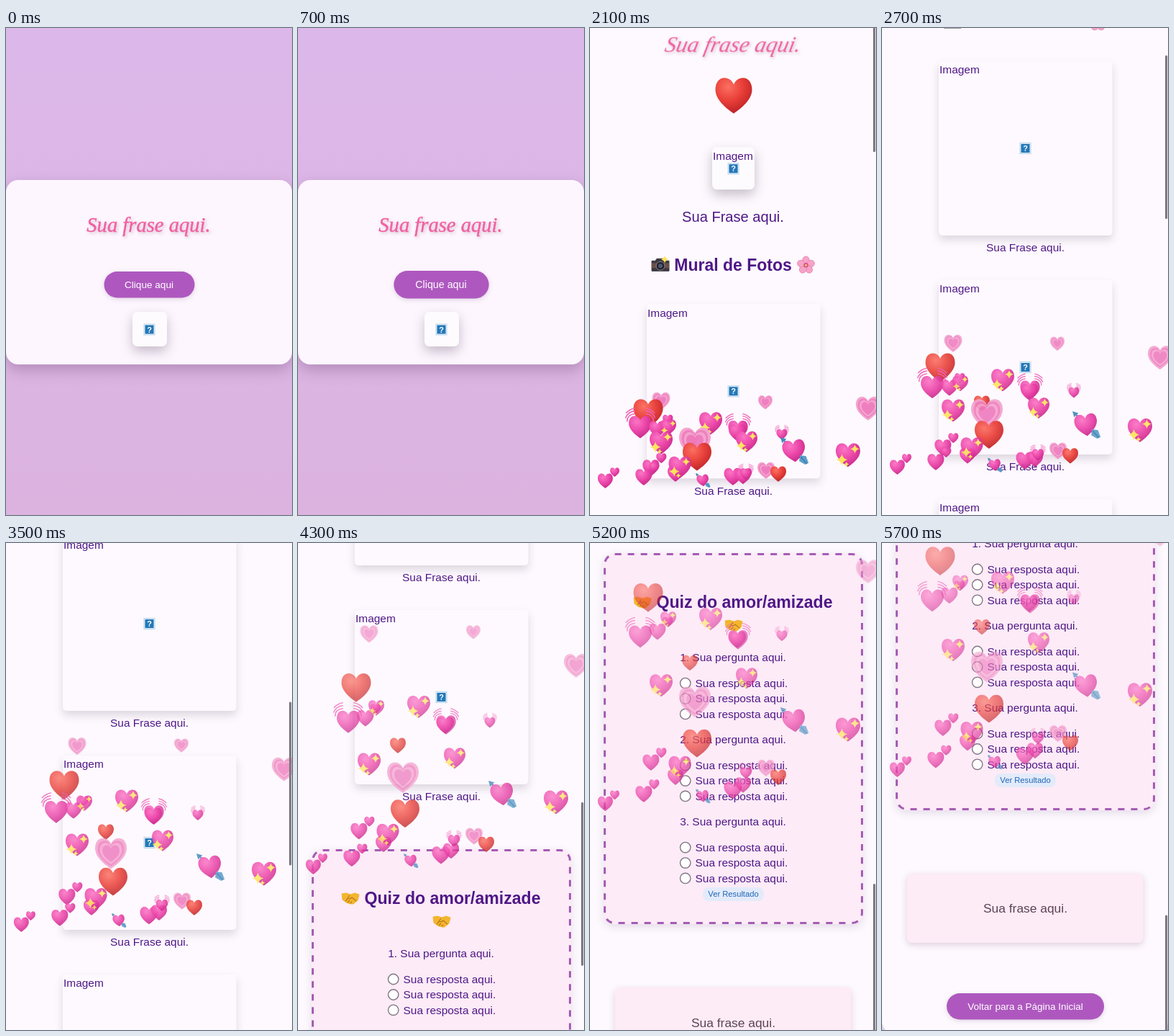
Recreate the animation shown at these times as an HTML page. Size 398x676 px, loop 5.8 s.

```html
<!DOCTYPE html>
<html lang="pt">
<head>
<meta charset="utf-8">
<title>Sua frase aqui</title>
<style>
html, body { margin: 0; width: 100%; height: 100%; overflow: hidden; background: #dcb6e6; }
svg { display: block; width: 398px; height: 676px; font-family: "Liberation Sans", Arial, sans-serif; fill: #4f1787; }
.script { font-family: "Liberation Serif", serif; font-style: italic; fill: #f0609f;
  filter: drop-shadow(2px 2px 2px rgba(110, 40, 90, .26)); }
.mid { text-anchor: middle; }
.bold { font-weight: bold; }
.white { fill: #fff; }
.panel { fill: #fdf6fe; filter: drop-shadow(0 8px 10px rgba(60, 20, 70, .25)); }
.photo { fill: #fdf9fe; filter: drop-shadow(0 6px 6px rgba(40, 20, 50, .15)); }
.small { fill: #fefbff; filter: drop-shadow(0 7px 8px rgba(40, 20, 50, .26)); }
.pill { fill: #ae58bf; filter: drop-shadow(0 2px 3px rgba(70, 20, 80, .15)); }
.quiz { fill: #fdebf7; filter: drop-shadow(0 4px 6px rgba(60, 20, 70, .12)); }
.dash { fill: none; stroke: #a55cb4; stroke-width: 3; stroke-dasharray: 9 9; }
.note { fill: #fdebf5; filter: drop-shadow(0 3px 4px rgba(90, 30, 80, .18)); }
.radio { fill: #fff; stroke: #807784; stroke-width: 1.4; }
</style>
</head>
<body>
<svg id="stage" viewBox="0 0 398 676">
  <defs>
    <linearGradient id="sky" x2="0" y2="1">
      <stop stop-color="#dcb8ea"/><stop offset="1" stop-color="#dcb3df"/>
    </linearGradient>
    <radialGradient id="red" cx=".35" cy=".25" r=".8">
      <stop stop-color="#fb7062"/><stop offset=".5" stop-color="#e93f38"/><stop offset="1" stop-color="#b81f24"/>
    </radialGradient>
    <radialGradient id="pink" cx=".35" cy=".25" r=".8">
      <stop stop-color="#fb74c4"/><stop offset=".5" stop-color="#ec45a9"/><stop offset="1" stop-color="#c42287"/>
    </radialGradient>
    <path id="heart" d="M0 15.6C-3.5 13-16 5-16-5.2C-16-11.6-12.6-15.4-8-15.4C-4.4-15.4-1.4-13.2 0-9.6C1.4-13.2 4.4-15.4 8-15.4C12.6-15.4 16-11.6 16-5.2C16 5 3.5 13 0 15.6Z"/>
    <path id="star" d="M0-6Q1-1 6 0Q1 1 0 6Q-1 1-6 0Q-1-1 0-6Z" fill="#ffe45c"/>
    <g id="r"><use href="#heart" fill="url(#red)"/></g>
    <g id="p"><use href="#heart" fill="url(#pink)"/></g>
    <g id="g">
      <use href="#heart" fill="#f3a3cf"/>
      <use href="#heart" fill="#ee80bd" transform="scale(.84)"/>
      <use href="#heart" fill="#f5a2d0" transform="scale(.7)"/>
      <use href="#heart" fill="#ee7cbe" transform="scale(.54)"/>
    </g>
    <g id="b">
      <use href="#p" transform="translate(0 4) scale(.76)"/>
      <path fill="none" stroke="#f062b4" stroke-width="1.2" stroke-linecap="round"
        d="M-14-2Q-14-9-6-10M-15.5-6Q-13-12-6-13M-15-11Q-11-15-6-16M14-2Q14-9 6-10M15.5-6Q13-12 6-13M15-11Q11-15 6-16"/>
    </g>
    <g id="s">
      <use href="#p"/>
      <use href="#star" transform="translate(-8 6) scale(1.25)"/>
      <use href="#star" transform="translate(9 -8)"/>
      <use href="#star" transform="translate(-2 12) scale(.6)"/>
    </g>
    <g id="a">
      <path d="M-13-13L-6-7M6 7L13 13" stroke="#4b86b4" stroke-width="2"/>
      <path d="M-16-16l7 2-5 5z" fill="#4489bd"/>
      <use href="#p" transform="rotate(-8) scale(.83)"/>
      <path d="M7 5l7 1 3 8-4 2-7-4z" fill="#5a9dcb"/>
      <path d="M8 7l7 8" stroke="#346f9e"/>
    </g>
    <g id="t">
      <use href="#p" transform="translate(-5 5) scale(.7)"/>
      <use href="#p" transform="translate(9 -8) scale(.43)"/>
    </g>
    <g id="icon">
      <rect x="-8" y="-8" width="16" height="16" fill="#b7d3ea"/>
      <rect x="-6.5" y="-6.5" width="13" height="13" fill="#2378b8" stroke="#fff" stroke-width=".8"/>
      <text class="mid bold white" y="4" font-size="11">?</text>
    </g>
    <g id="camera">
      <path d="M-12-6h5l2-3h9l2 3h6v14h-24z" fill="#3b3840" stroke="#3b3840" stroke-linejoin="round"/>
      <path d="M-12-3h24v7h-24z" fill="#6b4f48"/>
      <circle cy="1" r="6" fill="#24222a" stroke="#8b858f"/>
      <circle cy="1" r="3" fill="#4d5878"/>
      <use href="#star" transform="translate(6 -8) scale(.9)"/>
    </g>
    <g id="flower"></g>
    <g id="shake">
      <path d="M-12-6L-6-7 0-5 6-7 12-5 10 3 4 8 0 8-6 6-11 2Z" fill="#f3b52f" stroke="#f3b52f" stroke-linejoin="round"/>
      <path d="M-1-4L-4 0Q-1 2 2-1L8 4M-7 4l3-3M-4 6l3-3M0 7l2-2" fill="none" stroke="#b5741a" stroke-width="1.1"/>
    </g>
  </defs>
  <g id="intro"></g>
  <g id="page"></g>
  <g id="hearts"></g>
  <rect id="bar" x="394" width="3.2" height="227" rx="1.6" fill="#7e7882"/>
</svg>
<script>
const LOOP = 5800, STEP = 100, OPEN = 1000;
const $ = id => document.getElementById(id);
const box = (cls, x, y, w, h, r, more = "") =>
  `<rect class="${cls}" x="${x}" y="${y}" width="${w}" height="${h}" rx="${r}" ${more}/>`;
const put = (id, x, y, size = 32) => `<use href="#${id}" transform="translate(${x} ${y}) scale(${size / 32})"/>`;
// y is the optical middle of the line
const text = (s, x, y, size, cls = "mid", fill = "") =>
  `<text class="${cls}" x="${x}" y="${y + size * .34}" font-size="${size}"${fill && ` style="fill:${fill}"`}>${s}</text>`;
const BODY = 15.45;

$("flower").innerHTML = [0, 72, 144, 216, 288].map(a =>
  `<ellipse cy="-7" rx="4.8" ry="5.4" fill="#f6a3c8" stroke="#e27fae" stroke-width=".7" transform="rotate(${a})"/>`
).join("") + `<circle r="3.2" fill="#d84f80"/><circle r="1.5" fill="#f7d268"/>`;

$("intro").innerHTML =
  `<rect width="398" height="676" fill="url(#sky)"/>` +
  box("panel", 0, 211, 398, 256, 17) +
  `<text class="mid script" x="198.5" y="283" font-size="28.6" stroke="#f0609f" stroke-width=".4">Sua frase aqui.</text>` +
  `<g id="press">${box("pill", 136.5, 338, 126, 36.5, 18.2)}${text("Clique aqui", 199, 356.5, 13.6, "mid white")}</g>` +
  box("small", 176, 394, 48, 48, 7) + put("icon", 199.5, 418.5);

function photo(i) {
  const y = 417 + 304 * i;
  return box("photo", 79, y, 241.5, 242, 5) + text("Imagem", 80, y + 12, BODY, "") +
    put("icon", 199.5, y + 121) + text("Sua Frase aqui.", 199.5, y + 259, BODY);
}

function question(i) {
  const y = 2110 + 114 * i;
  const answers = [35.5, 57, 78.3].map(d =>
    `<circle class="radio" cx="132.7" cy="${y + d}" r="7.2"/>` + text("Sua resposta aqui.", 146.5, y + d, BODY, ""));
  return text(`${i + 1}. Sua pergunta aqui.`, 199, y, BODY) + answers.join("");
}

$("page").innerHTML =
  `<rect y="-100" width="398" height="3000" fill="#dfd0e8"/>` +
  `<rect y="-8" width="398" height="2798" rx="17" fill="#fdf9fe"/>` +
  `<text class="mid script" transform="translate(197 67) skewX(-12)" font-size="31.3">Sua frase aqui.</text>` +
  put("r", 200, 127.5, 51) +
  box("small", 170, 199, 59, 59, 7) + text("Imagem", 171, 211, BODY, "") + put("icon", 199.5, 229) +
  text("Sua Frase aqui.", 199, 295.5, 20.1) +
  put("camera", 98, 363) + text("Mural de Fotos", 199, 363, 23, "mid bold") + put("flower", 300.5, 363) +
  [0, 1, 2, 3, 4].map(photo).join("") +
  box("quiz", 19, 1965, 361, 515, 15) + box("dash", 20.5, 1966.5, 358, 512, 14, `pathLength="1710"`) +
  put("shake", 73, 2033) + text("Quiz do amor/amizade", 215, 2033, 23.1, "mid bold") + put("shake", 200, 2065) +
  [0, 1, 2].map(question).join("") +
  `<rect x="157" y="2429" width="85" height="19" rx="8" fill="#e3ebfa"/>` +
  text("Ver Resultado", 199.5, 2438.5, 11.2, "mid", "#1f66b8") +
  box("note", 34.5, 2568, 329, 96, 7) + text("Sua frase aqui.", 199.5, 2616.5, 17.4, "mid", "#5c4358") +
  box("pill", 90, 2734, 219, 36.5, 18.2) + text("Voltar para a Página Inicial", 199.5, 2752.5, 13.5, "mid white");

// kind, x, y at float time 0, width
const HEARTS = [
  ["g", 99, 282, 25], ["g", 244, 281, 20], ["g", 387, 314, 34], ["r", 81, 336, 41],
  ["b", 70, 368, 42], ["t", 99, 366, 33], ["s", 109, 361, 22], ["s", 168, 358, 32],
  ["b", 206, 373, 36], ["p", 205, 379, 24], ["s", 218, 413, 30], ["b", 267, 375, 20],
  ["r", 139, 401, 22], ["s", 99, 419, 32], ["g", 146, 431, 44], ["r", 149, 470, 40],
  ["a", 284, 450, 38], ["s", 359, 459, 34], ["t", 90, 486, 33], ["t", 80, 515, 33],
  ["p", 119, 506, 22], ["s", 125, 494, 31], ["a", 157, 524, 20], ["p", 199, 517, 25],
  ["p", 213, 513, 22], ["b", 217, 500, 22], ["g", 245, 497, 24], ["r", 262, 506, 22],
  ["t", 26, 525, 30]
].map(([kind, x, y, size]) => {
  const el = document.createElementNS("http://www.w3.org/2000/svg", "use");
  el.setAttribute("href", "#" + kind);
  $("hearts").append(el);
  // all leave the same line below the stage together
  return { el, x, y, size, speed: (790 - y - .8 * (size - 25)) / 2610 };
});

const SCROLL = [[1900, 0], [2700, 371], [3500, 1034], [4300, 1540], [4800, 1751], [5700, 2109]];
const FLOAT = [[990, -2610], [1400, -2200], [2700, -800], [4800, 1300], [5700, 1390]];
const DROP = [[1900, -76], [2400, 0], [4800, 0], [5700, -76]];

function track(points, t, smooth) {
  const last = points.length - 1;
  if (t <= points[0][0]) return points[0][1];
  if (t >= points[last][0]) return points[last][1];
  const i = points.findIndex(p => p[0] > t) - 1;
  const [t0, v0] = points[i], [t1, v1] = points[i + 1];
  const d = t1 - t0, u = (t - t0) / d;
  if (!smooth) return v0 + (v1 - v0) * u;
  const slope = k => (points[k + 1][1] - points[k][1]) / (points[k + 1][0] - points[k][0]);
  const tangent = k => k === 0 || k === last ? 0 : (slope(k - 1) + slope(k)) / 2;
  const w = 1 - u;
  return v0 * w * w * (1 + 2 * u) + v1 * u * u * (3 - 2 * u) + d * u * w * (tangent(i) * w - tangent(i + 1) * u);
}

const clamp = v => Math.max(0, Math.min(1, v));
const show = (el, on) => { el.style.display = on ? "" : "none"; };

function draw(t) {
  const open = t >= OPEN, y = track(SCROLL, t, true);
  show($("intro"), !open);
  show($("page"), open);
  show($("hearts"), open);
  show($("bar"), y > 0);
  if (!open) {
    const k = 1 + .05 * clamp((t - 400) / 300);
    $("press").setAttribute("transform", `translate(199.5 356.2) scale(${k}) translate(-199.5 -356.2)`);
    return;
  }
  $("page").setAttribute("transform", `translate(0 ${-y})`);
  $("bar").setAttribute("y", 38 + (y - 371) / 3.632);
  const time = track(FLOAT, t), drop = track(DROP, t);
  for (const h of HEARTS) {
    const hy = h.y - h.speed * time + drop;
    h.el.setAttribute("transform", `translate(${h.x} ${hy}) scale(${h.size / 32})`);
    // faster hearts fade sooner
    h.el.style.opacity = clamp(1 - h.speed * (t - 1900) / 1300);
  }
}

const start = performance.now();
function tick() {
  const t = (performance.now() - start) % LOOP;
  draw(Math.floor(t / STEP) * STEP);
  requestAnimationFrame(tick);
}
tick();
</script>
</body>
</html>
```
